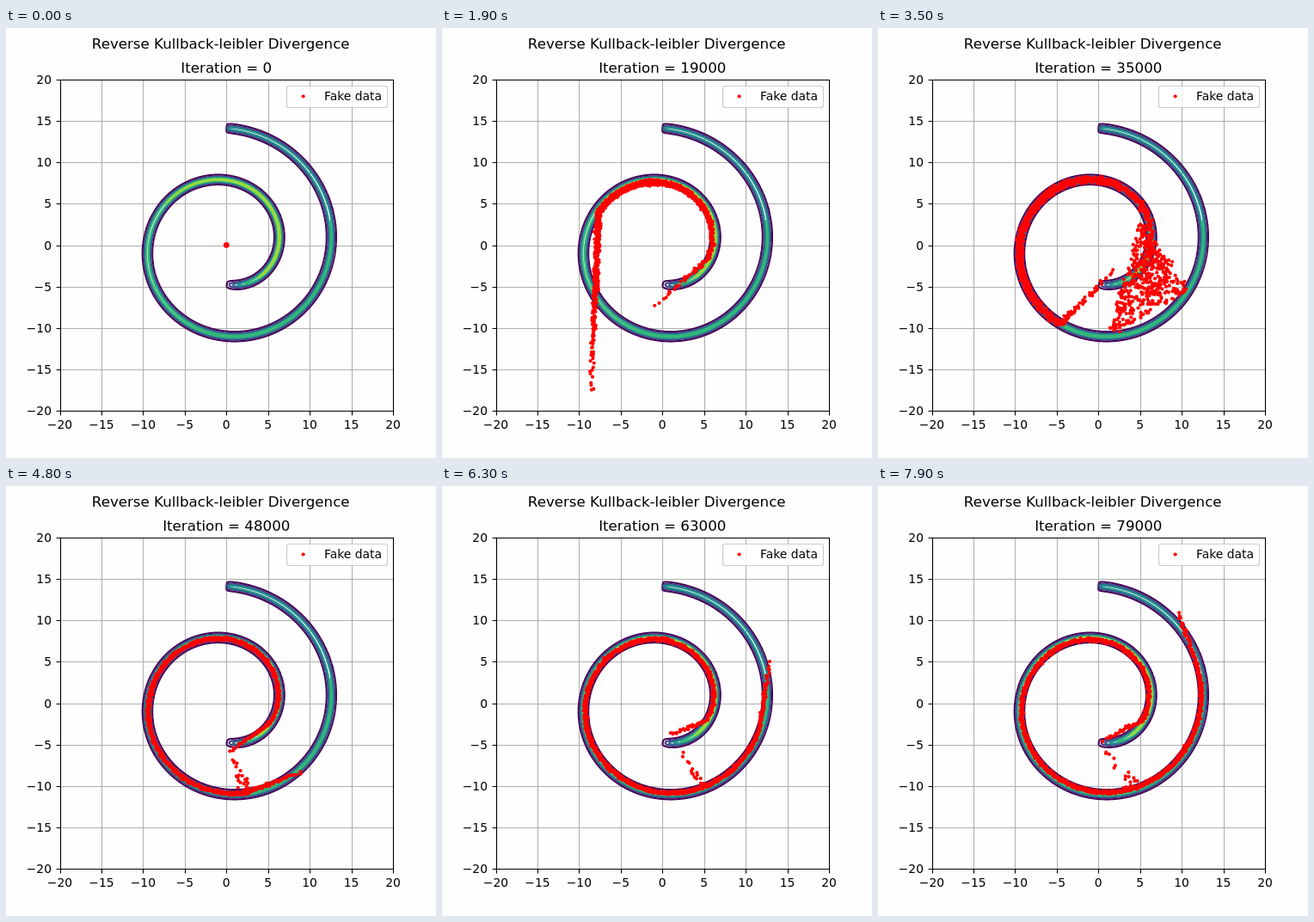
These frames come from a looping animation (500x500 px, 8 s). An HTML page:

```html
<!DOCTYPE html>
<html lang="en">
<head>
<meta charset="utf-8">
<title>Divergence training</title>
<style>
  html, body { margin: 0; width: 100%; height: 100%; overflow: hidden; background: #fefefe; }
  svg { display: block; width: 100vw; height: 100vh; }
  text { font: 13.89px "DejaVu Sans", sans-serif; fill: #000; }
  .mid { text-anchor: middle; }
  .end { text-anchor: end; }
  .title { font-size: 16.67px; }
  #grid, #contours, #axes { fill: none; }
  #dots { fill: none; stroke: #f00; stroke-width: 4.2; stroke-linecap: round; }
</style>
</head>
<body>
<svg viewBox="0 0 500 500">
  <defs><clipPath id="area"><rect x="62.5" y="60" width="387.5" height="385"/></clipPath></defs>
  <path id="grid" stroke="#b0b0b0" stroke-width="1.11"/>
  <g id="contours" stroke-width="2.08" stroke-linejoin="round"></g>
  <path id="dots" clip-path="url(#area)"/>
  <path id="axes" stroke="#000" stroke-width="1.11"/>
  <g id="labels"></g>
  <text class="title mid" x="249.7" y="24">Reverse Kullback-leibler Divergence</text>
  <text class="title mid" id="iteration" x="256.25" y="52"></text>
  <rect x="326.5" y="67.5" width="117" height="25" rx="2.8" fill="#fff" fill-opacity=".8" stroke="#ccc" stroke-width="1.2"/>
  <circle cx="345.6" cy="79.5" r="2.1" fill="#f00"/>
  <text x="370" y="84">Fake data</text>
</svg>
<script>
const byId = id => document.getElementById(id);
const X = x => 256.25 + x * 9.6875;
const Y = y => 252.5 - y * 9.625;
const snap = v => Math.floor(v + 0.5) + 0.5;
const at = (x, y) => `${X(x).toFixed(2)} ${Y(y).toFixed(2)}`;
const mix = (a, b, k) => Array.isArray(a) ? a.map((v, i) => mix(v, b[i], k)) : a + (b - a) * k;
const spiral = (t, inset = 0) => [(t - inset) * Math.cos(t), (t - inset) * Math.sin(t)];
const distance = (a, b) => Math.hypot(a[0] - b[0], a[1] - b[1]);

function add(parent, tag, attrs, text = "") {
  const node = document.createElementNS("http://www.w3.org/2000/svg", tag);
  for (const name in attrs) node.setAttribute(name, attrs[name]);
  node.textContent = text;
  byId(parent).append(node);
}

function drawAxes() {
  let grid = "", axes = "M63.5 60.5H450.5V445.5H63.5Z";
  for (let v = -20; v <= 20; v += 5) {
    const x = snap(X(v)), y = snap(Y(v)), label = String(v).replace("-", "\u2212");
    grid += `M${x} 60V445M63 ${y}H450`;
    axes += `M${x} 445.5v4.9M63.5 ${y}h-4.9`;
    add("labels", "text", { class: "mid", x: X(v), y: 466 }, label);
    add("labels", "text", { class: "end", x: 53, y: Math.round(Y(v) + 5) }, label);
  }
  byId("grid").setAttribute("d", grid);
  byId("axes").setAttribute("d", axes);
}

// Density along the spiral: fades outwards, ramps up slowly at the inner tip
// and abruptly at the outer one.
const inner = 1.5 * Math.PI, outer = 4.5 * Math.PI;
const ramp = (d, scale) => 1 - Math.exp(-d / scale);
const height = t => (7.2 - t / 4) * ramp(t - inner, .4) * ramp(outer - t, .015);

function drawContours() {
  const sigma = .225;
  const colors = ["#440154", "#443983", "#31688e", "#21918c", "#35b779", "#9bd93c"];
  colors.forEach((stroke, i) => {
    const level = i || .15, left = [], right = [];
    for (let t = inner; t < outer; t += .002) {
      const h = height(t);
      if (h <= level) continue;
      const c = Math.cos(t), s = Math.sin(t);
      const w = sigma * Math.sqrt(2 * Math.log(h / level)) / Math.hypot(1, t);
      const nx = (s + t * c) * w, ny = (t * s - c) * w;
      left.push(at(t * c + nx, t * s + ny));
      right.unshift(at(t * c - nx, t * s - ny));
    }
    add("contours", "path", { stroke, d: "M" + left.concat(right).join("L") + "Z" });
  });
}

// A strand runs straight from start to the spiral, follows it over arc (angles),
// then leaves it straight to end. Loose dots fall from start to the ring part fall.
const reach = { time: 900, start: [-.2, -8.4], arc: [6.05, 8.3], end: [-12, -.6],
  inset: .2, jitter: .2, even: 0, loose: 0, fall: [11.1, 12.1] };
const poses = [
  { ...reach, time: 0, jitter: .05 },
  { ...reach, time: 300, start: [17, -19], end: [-14, -1] },
  reach,
  { ...reach, time: 1800 },
  { ...reach, time: 1900, start: [-1, -7.4], arc: [5.95, 8.95], end: [-8.6, -18], inset: .35, jitter: .14 },
  { ...reach, time: 3500, start: [5, 3], arc: [6.1, 10.55], end: [2, -3], inset: 0, jitter: .17, even: .2, loose: 430 },
  { time: 4800, start: [.4, -5.8], arc: [5.85, 11.2], end: [9, -8.3],
    inset: .1, jitter: .09, even: .6, loose: 25, fall: [11.15, 11.3] },
  { time: 6300, start: [.8, -3.9], arc: [5.9, 12.3], end: [12.9, 4.9],
    inset: .2, jitter: .1, even: .7, loose: 18, fall: [11.4, 11.5] },
  { time: 7900, start: [.2, -4.6], arc: [5.9, 13], end: [9.6, 11],
    inset: .25, jitter: .1, even: .7, loose: 20, fall: [11.25, 11.5] }
];

function poseAt(time) {
  const i = Math.max(1, poses.findIndex(p => p.time >= time));
  const a = poses[i - 1], b = poses[i], k = (time - a.time) / (b.time - a.time);
  return Object.fromEntries(Object.keys(a).map(key => [key, mix(a[key], b[key], k)]));
}

// Maps 0..1 to a point of the strand, in proportion to length.
function strandOf({ start, arc, end, inset }) {
  const join = spiral(arc[0], inset), leave = spiral(arc[1], inset);
  const head = distance(start, join), tail = distance(leave, end);
  const body = (arc[1] ** 2 - arc[0] ** 2) / 2;
  return u => {
    const s = u * (head + body + tail);
    if (s < head) return mix(start, join, s / head);
    if (s > head + body) return mix(leave, end, (s - head - body) / tail);
    return spiral(Math.sqrt(arc[0] ** 2 + 2 * (s - head)), inset);
  };
}

function randomFrom(seed) {
  return () => {
    seed = (seed + 0x6D2B79F5) | 0;
    let v = Math.imul(seed ^ (seed >>> 15), 1 | seed);
    v = (v + Math.imul(v ^ (v >>> 7), 61 | v)) ^ v;
    return ((v ^ (v >>> 14)) >>> 0) / 4294967296;
  };
}

function dotsPath(step) {
  const time = step * 100, p = poseAt(time), strand = strandOf(p);
  const grow = Math.min(1, time / 300), count = 1500;
  const rand = randomFrom(step * 977 + 11);
  const noise = () => (rand() + rand() + rand() + rand() - 2) * 1.73 * p.jitter;
  let d = "";
  const dot = ([x, y]) => { d += `M${at(x * grow + noise(), y * grow + noise())}h.01`; };
  for (let n = 0; n < count; n++) {
    const q = (n + rand()) / count;
    const bell = .5 + Math.log(q / (1 - q)) / 10.2;
    const u = mix(bell, q, p.even);
    if (u >= 0 && u <= 1) dot(strand(u));
  }
  const [low, high] = p.fall.map(t => spiral(t));
  for (let n = 0; n < Math.round(p.loose); n++) {
    dot(mix(p.start, mix(low, high, rand()), Math.sqrt(rand())));
  }
  return d;
}

let shown = -1;
function render(now) {
  const step = Math.floor((now % 8000) / 100);
  if (step === shown) return;
  shown = step;
  byId("dots").setAttribute("d", dotsPath(step));
  byId("iteration").textContent = "Iteration = " + step * 1000;
}

drawAxes();
drawContours();
const begin = performance.now();
function tick() {
  render(performance.now() - begin);
  requestAnimationFrame(tick);
}
tick();
</script>
</body>
</html>
```
